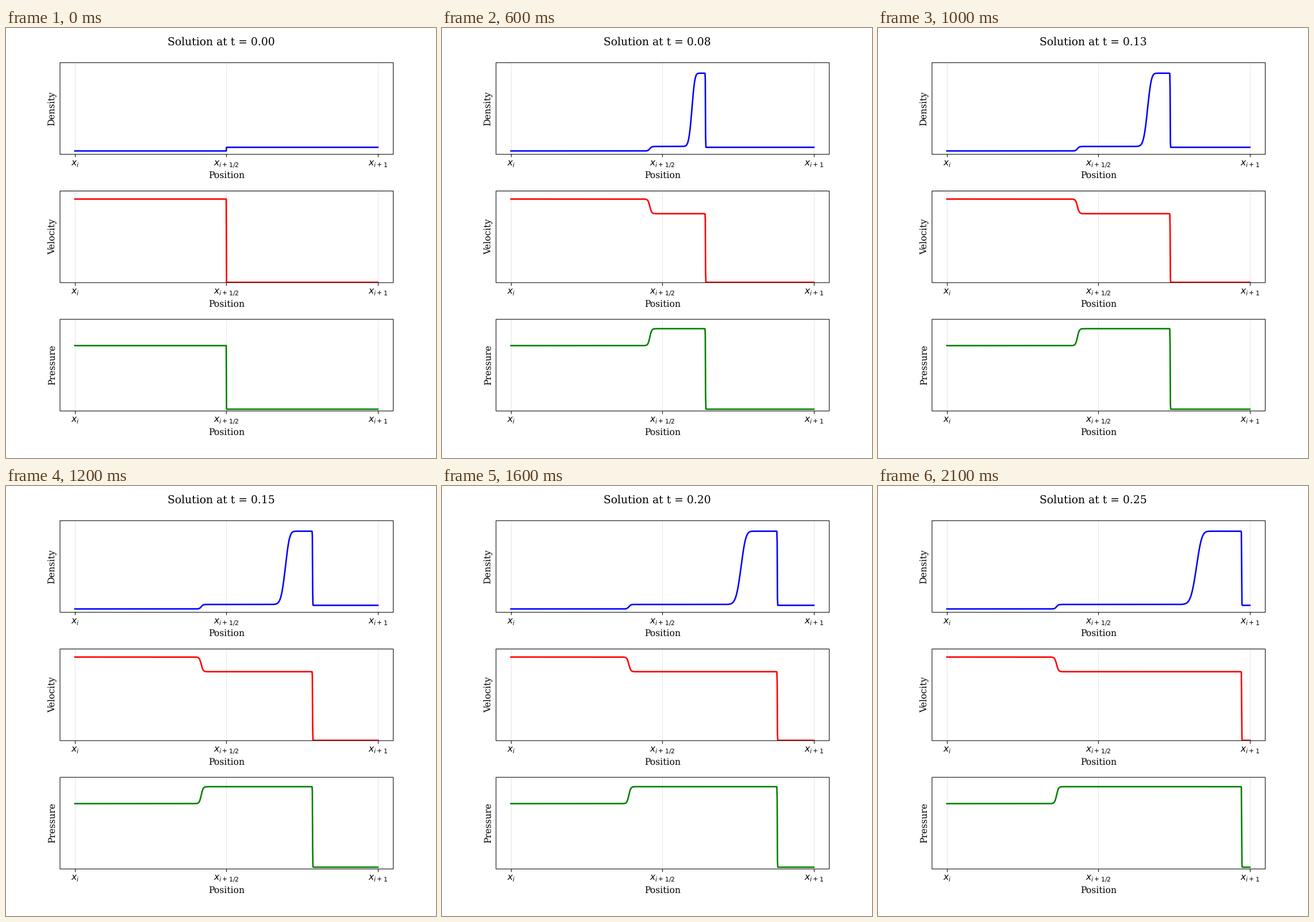
Write a matplotlib script that moves like this. It is 748 px wide and 748 px high and loops after 2200 ms.

```python
import math

import numpy as np
import matplotlib.pyplot as plt
from matplotlib.animation import FuncAnimation
from matplotlib.patches import Rectangle
from matplotlib.transforms import ScaledTranslation

plt.rcParams.update({"font.family": "DejaVu Serif", "font.size": 12,
                     "text.hinting": "none"})

FRAMES = 22
DT, T_END = 0.01253, 0.25

# Wave speeds in domain widths per unit time
V_REVERSE, V_CONTACT, V_SHOCK = -0.552, 1.293, 1.892

# Plateau heights as fractions of the axis:
# left, behind the reverse wave, behind the shock, right
PANELS = [
    ("Density", "blue", (0.034, 0.083, 0.882, 0.0735)),
    ("Velocity", "red", (1 / 1.1, 0.7495, 0.7495, 0.0)),
    ("Pressure", "green", (0.71, 0.895, 0.895, 0.0165)),
]

x = np.linspace(0, 1, 1000)
erf = np.vectorize(math.erf)


def tanh_step(center, width):
    return 0.5 * (1 + np.tanh((x - center) / max(width, 1e-5)))


def erf_step(center, sigma, skew=0.03):
    """Diffused step, slightly sharper at its upper end."""
    u = np.clip((x - center) / max(sigma, 1e-5), -8, 8)
    return 0.5 * (1 + erf(u * (1 + skew * u) / math.sqrt(2)))


def profile(levels, t):
    left, star_l, star_r, right = levels
    reverse = tanh_step(0.5 + V_REVERSE * t, 0.0063 * (1 - math.exp(-t / 0.02)))
    contact = erf_step(0.5 + V_CONTACT * t, 0.0288 * math.sqrt(t))
    shock = tanh_step(0.5 + V_SHOCK * t, min(0.0005, t))
    y = left + (star_l - left) * reverse + (star_r - star_l) * contact
    return y + (right - y) * shock


fig, axes = plt.subplots(3, 1, figsize=(8, 8), dpi=93.5)
fig.subplots_adjust(left=0.125, right=0.9, bottom=0.11, top=0.92, hspace=0.4)
title = fig.suptitle("Solution at t = 0.00", fontsize=14.4)
half_pixel = ScaledTranslation(0.005, -0.005, fig.dpi_scale_trans)


def add_frame(ax):
    """Soft-edged border in place of the pixel-snapped spines."""
    ax.spines[:].set_visible(False)
    ax.add_patch(Rectangle((0, 0), 1, 1, fill=False, lw=0.8, ec="black",
                           transform=ax.transAxes + half_pixel,
                           zorder=2.5, clip_on=False, snap=False))


lines = []
for ax, (name, color, levels) in zip(axes, PANELS):
    line, = ax.plot(x, profile(levels, 0), color=color, lw=2)
    lines.append(line)
    ax.set_xlim(-0.05, 1.05)
    ax.set_ylim(0, 1)
    ax.set_xticks([0, 0.5, 1], ["$x_i$", "$x_{i+1/2}$", "$x_{i+1}$"])
    ax.set_yticks([])
    ax.set_xlabel("Position")
    ax.set_ylabel(name)
    ax.grid(True, alpha=0.3)
    add_frame(ax)


def update(i):
    t = min(i * DT, T_END)
    title.set_text(f"Solution at t = {t:.2f}")
    for line, (_, _, levels) in zip(lines, PANELS):
        line.set_ydata(profile(levels, t))
    return [title, *lines]


anim = FuncAnimation(fig, update, frames=FRAMES, interval=100,
                     repeat=True, repeat_delay=0, blit=False)
plt.show()
```
